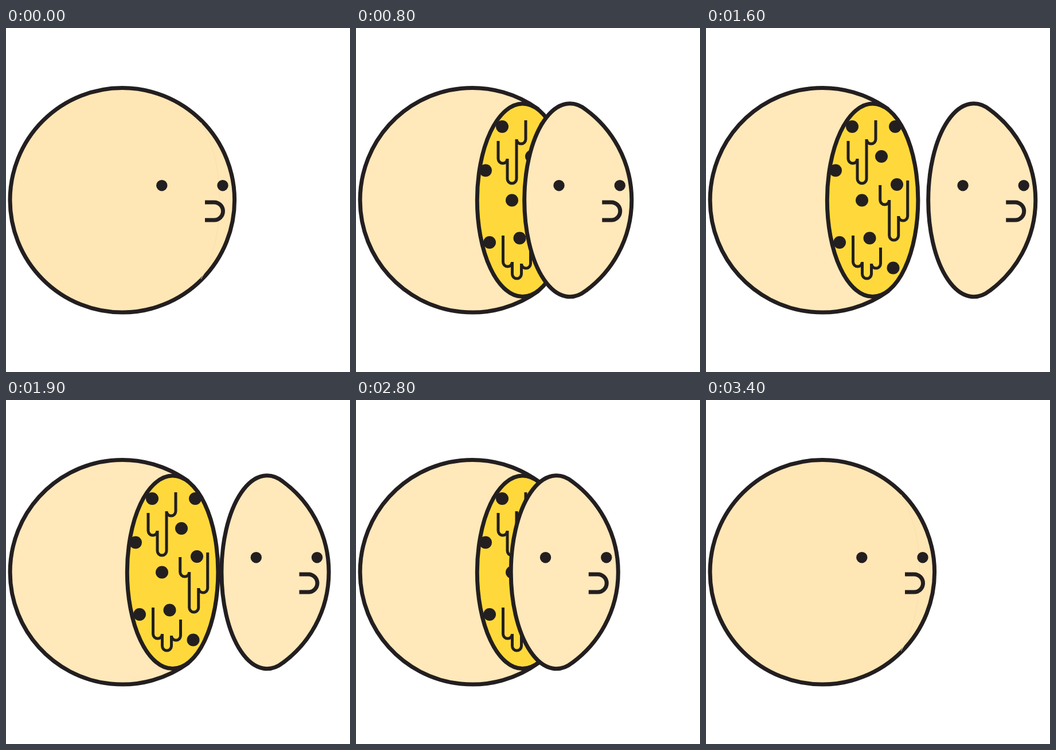
These frames come from a looping animation (600 px wide and 600 px high, 3.5 s). An HTML page:

```html
<!DOCTYPE html>
<html lang="en">
<head>
<meta charset="utf-8">
<title>Sliced ball</title>
<style>
  html, body { margin: 0; width: 100%; height: 100%; overflow: hidden; background: #fff; }
  svg { display: block; width: 100vw; height: 100vh; }
  .line { stroke: #231f20; stroke-width: 7; }
  .skin { fill: #ffe8ba; }
  .closed .skin { fill: #ffe6b5; }
  .seam { fill: none; stroke: #f6dfae; stroke-width: 1; }
  .drip { fill: none; stroke: #231f20; stroke-width: 5; }
  .dark { fill: #231f20; }
  .closed .cut, svg:not(.closed) .whole { display: none; }
</style>
</head>
<body>
<svg id="stage" viewBox="0 0 600 600">
  <g class="whole">
    <circle class="skin line" cx="202.8" cy="300.3" r="195.8"/>
    <path class="seam" d="M340 165A81 170 0 0 1 340 438"/>
  </g>
  <g class="cut">
    <path class="skin line" d="M318.4 142.2A195.8 195.8 0 1 0 318.4 458.4"/>
    <ellipse class="line" fill="#ffd93b" cx="290.6" cy="300.3" rx="79.3" ry="168.3"/>
    <g id="holes" class="dark"></g>
    <g id="drips" class="drip"></g>
  </g>
  <g id="slice">
    <path class="cut skin line" d="M318.8 142.5A79.5 168.5 0 1 0 318.8 458.1A196 196 0 0 0 318.8 142.5Z"/>
    <circle class="dark" cx="271.8" cy="274.7" r="9.7"/>
    <circle class="dark" cx="378" cy="274.7" r="9.7"/>
    <path class="line" fill="none" d="M347 304H363a15.5 15.5 0 0 1 0 31H347"/>
  </g>
</svg>
<script>
  const $ = id => document.getElementById(id);
  const LOOP = 3500, STEP = 100, PEAK = 1700, TRAVEL = 1600, REACH = 188;

  const hole = (x, y) => `<circle cx="${x}" cy="${y}" r="11"/>`;
  // Slanted pairs that steepen downwards, and one lone hole per row
  const pairs = [[255, 172], [226, 248.5], [285.5, 366.5]];
  const lone = [330, 333, 233];
  $('holes').innerHTML = pairs.map(([x, y], i) =>
    hole(x, y) + hole(x + 51 - 5 * i, y + 52) + hole(lone[i], 172 + 101 * i)).join('');

  // A line that runs down or up by each length, with a round bend between runs
  const drip = (x, y, ...runs) =>
    `<path d="M${x} ${y}v${runs.join('a8 8 0 0 0 16 0v')}"/>`;
  $('drips').innerHTML =
    drip(248, 197, 31, 35, -69, -33) +
    drip(303.7, 274, 26, 62, -34, -62) +
    drip(256.5, 362, 46, 21, -18, -28);

  function draw(now) {
    const t = Math.floor(now % LOOP / STEP) * STEP;
    const open = Math.abs(t - PEAK) / TRAVEL;
    $('stage').classList.toggle('closed', open > 1);
    $('slice').setAttribute('transform', `translate(${REACH * Math.max(0, 1 - open)} 0)`);
  }

  const start = performance.now();
  function tick() {
    draw(performance.now() - start);
    requestAnimationFrame(tick);
  }
  tick();
</script>
</body>
</html>
```
